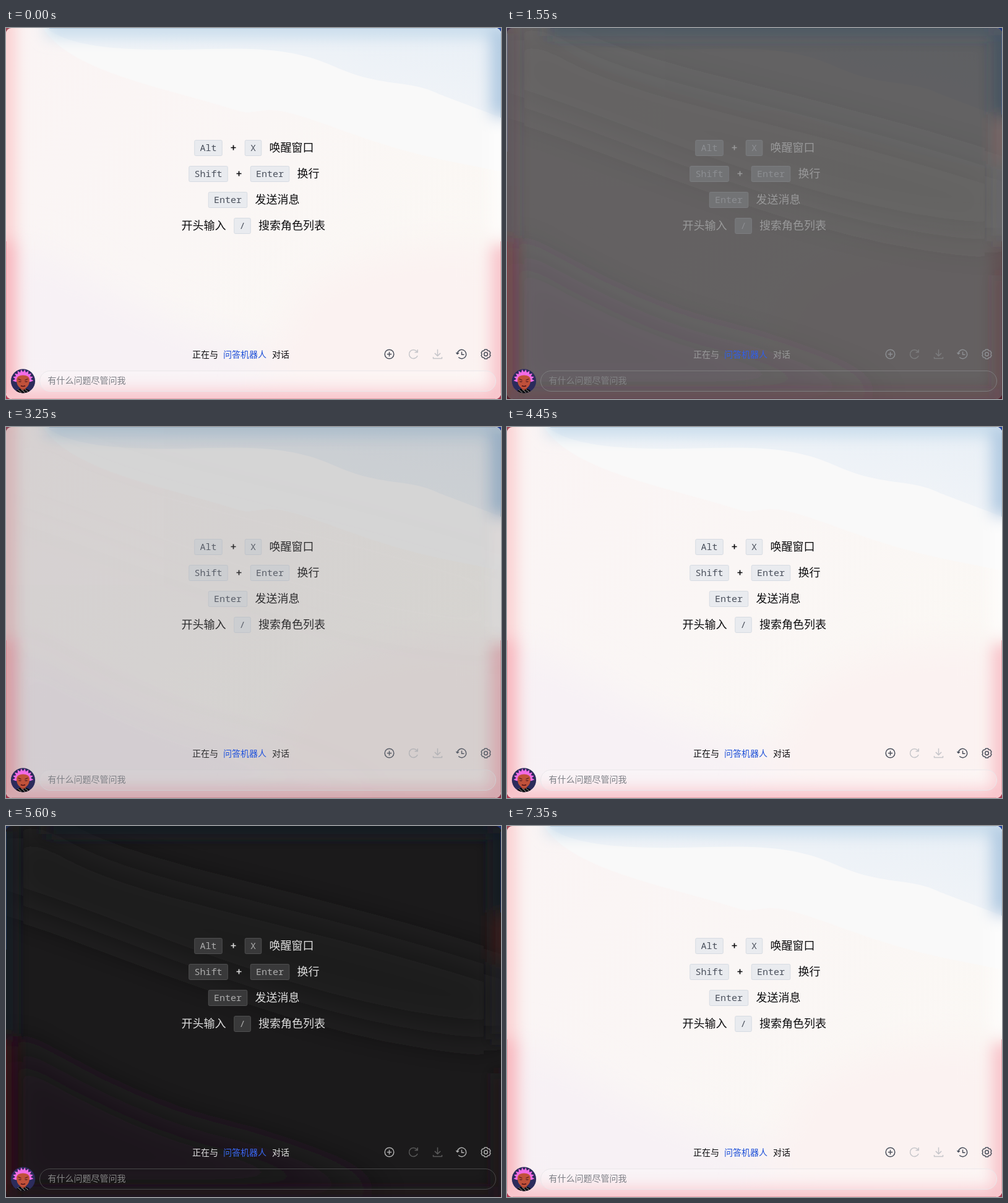
These frames come from a looping animation (800 by 600 pixels, 7400 ms). An HTML page:

```html
<!DOCTYPE html>
<html lang="zh-CN">
<head>
<meta charset="utf-8">
<title>Theme switch</title>
<style>
  html, body { margin: 0; width: 100%; height: 100%; overflow: hidden; background: #1b1a1b; }
  .scene { position: absolute; left: 0; top: 0; width: 800px; height: 600px; display: block; }
  .dark {
    --text: #dedede; --soft: #adadad; --off: #595959; --link: #3a69f4; --hint: #858585;
    --key: #39393a; --key-line: #505051; --line: #484849; --field: transparent;
  }
  .light {
    --text: #0b0b0d; --soft: #4a505c; --off: #c6c6ca; --link: #1c4fd8; --hint: #7d7f86;
    --key: #e9ebef; --key-line: #d6dbe2; --line: #ebe8eb; --field: rgba(255, 255, 255, .18);
    animation: theme 7400ms infinite;
  }
  @keyframes theme {
    0%, 18.84% { opacity: 1; animation-timing-function: ease; }
    24.24%, 41% { opacity: 0; animation-timing-function: ease; }
    46.41%, 64.24% { opacity: 1; animation-timing-function: ease; }
    69.65%, 87.65% { opacity: 0; animation-timing-function: ease; }
    93.05%, 100% { opacity: 1; }
  }
  text { font-family: "Noto Sans CJK SC", "Noto Sans CJK", "Noto Sans", sans-serif; fill: var(--text); }
  .big { font-size: 18px; font-weight: 500; }
  .small { font-size: 14px; }
  .medium { font-weight: 500; }
  .key rect { fill: var(--key); stroke: var(--key-line); }
  .key text { font: 15px "Noto Sans Mono", "DejaVu Sans Mono", monospace; fill: var(--soft); text-anchor: middle; }
  .plus { stroke: var(--text); stroke-width: 1.7; }
  .icon { fill: none; stroke: var(--soft); stroke-width: 1.5; stroke-linejoin: round; }
  .off { stroke: var(--off); }
</style>
</head>
<body>
<svg width="0" height="0" style="position:absolute">
  <defs>
    <filter id="glow" x="-100" y="-100" width="1000" height="800" filterUnits="userSpaceOnUse">
      <feGaussianBlur stdDeviation="13"/>
    </filter>
    <filter id="soft" x="-100" y="-100" width="1000" height="800" filterUnits="userSpaceOnUse">
      <feGaussianBlur stdDeviation="30"/>
    </filter>
    <linearGradient id="sky" x1="0" x2="1" y1="1" y2="0">
      <stop offset=".3" stop-color="#f3f5f8"/><stop offset="1" stop-color="#e8eff6"/>
    </linearGradient>
    <linearGradient id="ground" x1="0" x2="1" y1="0" y2=".6">
      <stop offset="0" stop-color="#faf4f4"/><stop offset=".5" stop-color="#faf6f5"/><stop offset="1" stop-color="#fbf8f4"/>
    </linearGradient>
    <clipPath id="window"><rect width="800" height="600" rx="9"/></clipPath>
    <clipPath id="face"><circle cx="27.5" cy="571" r="19.6"/></clipPath>
  </defs>
</svg>
<svg class="scene dark" viewBox="0 0 800 600"></svg>
<svg class="scene light" viewBox="0 0 800 600"></svg>
<script>
const edge = (d, color, width, opacity = 1) =>
  `<path d="${d}" fill="none" stroke="${color}" stroke-width="${width}" opacity="${opacity}"/>`;

// Desktop colours that peek out around the rounded window
const corners = (tl, tr, bl, br) =>
  `<path d="M0 0h400v300H0z" fill="${tl}"/><path d="M400 0h400v300H400z" fill="${tr}"/>
   <path d="M0 300h400v300H0z" fill="${bl}"/><path d="M400 300h400v300H400z" fill="${br}"/>`;

const lightBack = corners('#a24a58', '#2546a0', '#b43a52', '#a33a50') + `
  <g clip-path="url(#window)">
    <rect width="800" height="600" fill="url(#ground)"/>
    <path d="M0 345C120 385 210 470 340 500S560 560 620 600H0z" fill="#f7f1f5" filter="url(#soft)"/>
    <path d="M480 420Q640 330 800 360V600H400z" fill="#fbf2f1" filter="url(#soft)"/>
    <path d="M60 0C95 55 190 82 300 112S370 138 420 133S560 182 700 212T800 232V0z" fill="#f9f9f9"/>
    <path d="M65 0C105 32 190 36 280 35S450 26 530 62S650 82 700 107T800 145V0z" fill="url(#sky)"/>
    <g filter="url(#glow)">
      ${edge('M0 -20V345', '#fbc9ca', 26)}
      ${edge('M0 345V600', '#f8b0b8', 32)}
      ${edge('M0 600H800V350', '#f8bcc4', 28)}
      ${edge('M65 0H800', '#c3d9ea', 26)}
      ${edge('M800 0V145', '#a9c5df', 30)}
      ${edge('M800 145V340', '#fff', 30, .7)}
    </g>
    ${edge('M.5 345V591M9 599.5H791M799.5 345V591', '#e3929c', 1, .7)}
    ${edge('M70 .5H791M799.5 9V145', '#a9c3da', 1, .7)}
  </g>`;

const darkBack = corners('#1c2c50', '#1b2f70', '#241018', '#2a1018') + `
  <g clip-path="url(#window)">
    <rect width="800" height="600" fill="#1b1a1b"/>
    <path d="M60 0C180 90 420 110 800 232V345C500 330 200 180 0 120V0z" fill="#1d1a1b" filter="url(#soft)"/>
    <path d="M0 345Q210 470 340 500T620 600H0z" fill="#1e191b" filter="url(#soft)"/>
    <g filter="url(#glow)">
      ${edge('M0 0V340', '#151b26', 24)}
      ${edge('M0 345V600', '#3a1015', 22)}
      ${edge('M65 0H800V140', '#141a26', 26)}
      ${edge('M800 145V215', '#421a1c', 22)}
      ${edge('M800 220V345', '#222026', 22)}
      ${edge('M0 600H800V400', '#20161b', 18)}
    </g>
    ${edge('M.5 9V200', '#1d3052', 1)}
    ${edge('M.5 345V591', '#4a1018', 1)}
    ${edge('M799.5 9V140', '#1b2a58', 1)}
  </g>`;

const say = (x, y, str, cls, fill = '') =>
  `<text x="${x}" y="${y}" class="${cls}"${fill && ` style="fill:var(--${fill})"`}>${str}</text>`;

const key = (cx, cy, str) => {
  const w = str.length * 9 + 17.5;
  return `<g class="key"><rect x="${cx - w / 2}" y="${cy - 12.5}" width="${w}" height="25" rx="2"/>
    <text x="${cx}" y="${cy + 5.2}">${str}</text></g>`;
};

const plus = (x, y) => `<path class="plus" d="M${x - 4} ${y}h8M${x} ${y - 4}v8"/>`;

const hints = [
  key(327, 194, 'Alt'), plus(367.5, 193.5), key(399.5, 194, 'X'), say(425.5, 199.5, '唤醒窗口', 'big'),
  key(327, 236, 'Shift'), plus(376.5, 235.5), key(426.5, 236, 'Enter'), say(470.5, 241.5, '换行', 'big'),
  key(358.5, 278, 'Enter'), say(402.5, 283.5, '发送消息', 'big'),
  say(283.5, 325.5, '开头输入', 'big'), key(382, 320, '/'), say(408, 325.5, '搜索角色列表', 'big')
].join('');

const polar = (cx, cy, r, deg) => {
  const a = deg * Math.PI / 180;
  return `${(cx + r * Math.cos(a)).toFixed(2)},${(cy + r * Math.sin(a)).toFixed(2)}`;
};

const gear = Array.from({ length: 6 }, (_, i) => {
  const a = i * 60 - 90;
  return [polar(0, 0, 7.7, a - 14), polar(0, 0, 7.7, a + 14), polar(0, 0, 6.4, a + 30)].join(' ');
}).join(' ');

const icon = (x, body, off = '') => `<g class="icon ${off}" transform="translate(${x} 527.5)">${body}</g>`;

const icons = [
  icon(619.5, '<circle r="7.3"/><path d="M-3.7 0h7.4M0-3.7v7.4"/>'),
  icon(658.5, '<path d="M6.6 2.4A7 7 0 1 1 5.3-4.6L6.5-3M6.7-7.5v4.6H2.1"/>', 'off'),
  icon(697.5, '<path d="M0-7.8V2.8M-4.6-1.6L0 3L4.6-1.6M-7 4.4v2.5H7V4.4"/>', 'off'),
  icon(736.5, '<path d="M-7.1-1.2A7.2 7.2 0 1 1-5.2 5M-9-2.6l1.9 2.4L-4.6-2M0-4V.8h4"/>'),
  icon(775.5, `<polygon points="${gear}"/><circle r="2.9"/>`)
].join('');

const hair = Array.from({ length: 21 }, (_, i) =>
  polar(27.5, 569, i % 2 ? 17 : 12.5, 165 + i * 10.5)).join(' ');

const dots = Array.from({ length: 12 }, (_, i) =>
  `<circle cx="${19.5 + i * 1.5}" cy="${585 + (i * 5 % 4) * 1.3}" r=".6" fill="#eee"/>`).join('');

const avatar = `
  <g clip-path="url(#face)">
    <path d="M7 550h41v42H7z" fill="#2c2c5c"/>
    <polygon points="${hair}" fill="#f26ce4"/>
    <path d="M23 578h9v9h-9z" fill="#a5412f"/>
    <path d="M14 592Q17 584 23 583.5L27.5 586L32 583.5Q38 584 41 592z" fill="#0d0d10"/>${dots}
    <path d="M17 568Q18 561.5 27.5 561.5T38 568Q38.5 577 33 581.5Q27.5 585.5 22 581.5Q16.500 577 17 568z" fill="#c0513a"/>
    <path d="M19.500 567.500l5 2M35.500 567.500l-5 2M20.500 571.500q2 1.200 4 0M30.500 571.500q2 1.200 4 0" fill="none" stroke="#481821" stroke-width="1.2"/>
    <path d="M24 578.500q3.500 2 7 0" fill="none" stroke="#4c1219" stroke-width="1.5"/>
  </g>`;

const footer =
  say(301, 533, '正在与', 'small medium') +
  say(351, 533, '问答机器人', 'small medium', 'link') +
  say(430, 533, '对话', 'small medium') +
  `<rect x="54.5" y="554.5" width="737" height="33" rx="16.5" style="fill:var(--field);stroke:var(--line)"/>` +
  say(67.5, 575.3, '有什么问题尽管问我', 'small', 'hint');

const front = hints + footer + icons + avatar;
document.querySelector('.dark').innerHTML = darkBack + front;
document.querySelector('.light').innerHTML = lightBack + front;
</script>
</body>
</html>
```
